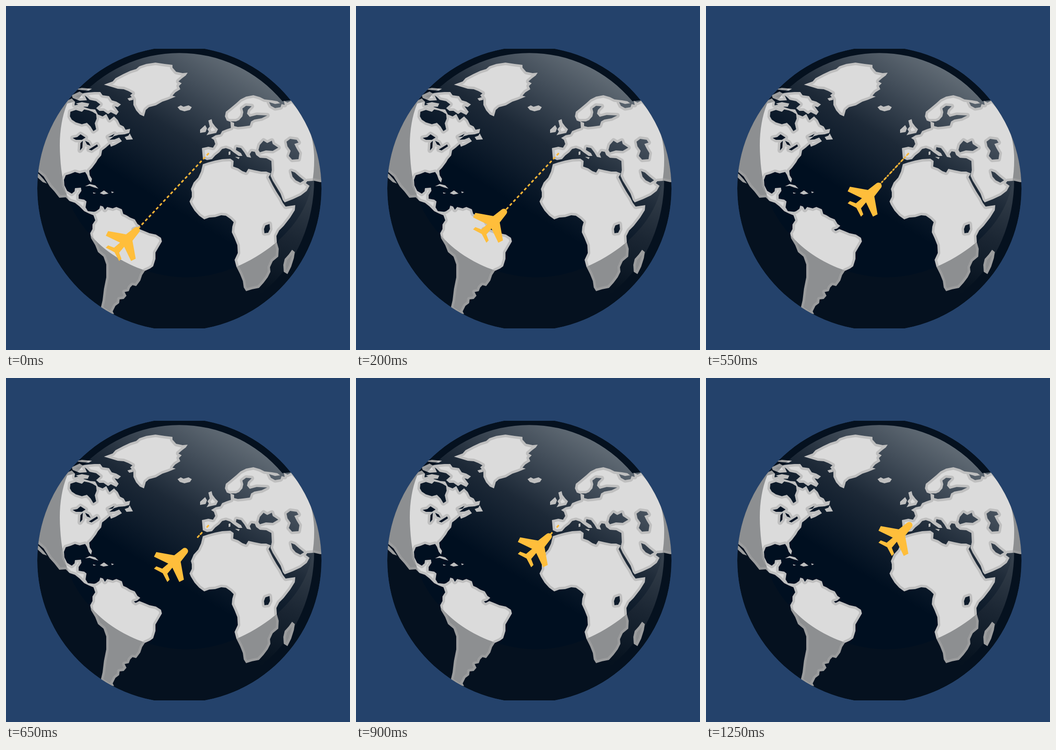
These frames come from a looping animation (748x748 px, 1.3 s). An HTML page:

```html
<!DOCTYPE html>
<html lang="en">
<head>
<meta charset="utf-8">
<title>Flight over the globe</title>
<style>
  html, body { margin: 0; width: 100%; height: 100%; overflow: hidden; background: #24426b; }
  svg { display: block; width: 100vw; height: 100vh; }
</style>
</head>
<body>
<svg viewBox="0 0 748 748">
  <defs>
    <linearGradient id="shine" gradientUnits="userSpaceOnUse" x1="330" y1="420" x2="520" y2="110">
      <stop offset="0" stop-color="#000f20"/>
      <stop offset=".4" stop-color="#1d2937"/>
      <stop offset=".7" stop-color="#434e5a"/>
      <stop offset="1" stop-color="#69737c"/>
    </linearGradient>
    <linearGradient id="glow" gradientUnits="userSpaceOnUse" x1="665" y1="390" x2="565" y2="615">
      <stop offset="0" stop-color="#35404c"/>
      <stop offset=".5" stop-color="#1b2633"/>
      <stop offset="1" stop-color="#06121f"/>
    </linearGradient>
    <clipPath id="band"><rect y="93" width="748" height="608"/></clipPath>
    <clipPath id="ball"><circle cx="377" cy="397" r="309"/></clipPath>
    <path id="lit" d="M133 212C118 250 115 290 118 330C122 400 143 455 184 498C230 552 310 590 395 590C470 590 545 552 592 510C650 458 672 400 670 325C668 275 650 235 620 205L601 207A293 295 0 0 0 153 207Z"/>
    <clipPath id="litClip"><use href="#lit"/></clipPath>

    <g id="land">
      <!-- Greenland, Iceland -->
      <path d="M213 171L232 164 238 157 255 148 270 141 283 137 290 131 305 126 325 123 345 126 362 128 362 134 370 143 384 146 395 145 391 151 383 157 375 164 382 168 376 174 379 181 368 188 362 195 369 197 352 204 340 208 326 216 311 220 304 226 300 240 291 236 283 227 277 215 277 203 270 194 275 190 266 185 256 181 243 180 230 176Z"/>
      <path d="M264 201L274 198 277 204 268 206ZM373 220L380 216 386 219 397 216 404 220 400 226 388 229 378 226Z"/>
      <!-- North America -->
      <path d="M40 215L132 206 143 201 150 208 149 216 160 214 170 220 183 224 194 225 200 236 210 240 218 235 225 248 235 240 243 248 248 258 256 262 260 269 270 267 268 276 258 279 245 280 235 283 225 291 236 290 246 286 252 294 238 302 228 306 226 300 217 308 209 314 207 325 200 333 196 340 187 352 181 358 182 368 187 376 185 384 180 378 176 367 172 361 160 364 150 361 140 365 130 368 126 378 127 390 133 402 143 408 149 403 150 396 163 395 164 402 158 411 158 419 170 421 175 425 173 438 178 446 196 448 190 455 180 451 170 446 160 436 150 428 138 424 130 416 116 417 105 403 95 392 82 371 69 360 40 340Z"/>
      <path d="M60 358L72 366 82 377 89 386 80 383 70 374Z"/>
      <path d="M152 181L165 178 187 180 180 184 165 183ZM165 190L180 188 192 187 205 187 210 194 224 196 230 205 240 208 250 214 243 220 236 218 245 230 240 237 228 231 222 235 212 228 203 228 196 222 205 214 196 207 182 204 176 198Z"/>
      <path d="M143 194L160 186 170 192 176 205 160 206 145 200ZM152 212L165 209 181 212 178 219 165 219ZM258 285L266 282 269 277 276 290 262 291Z"/>
      <path d="M172 392L182 387 194 390 201 397 190 394 182 391ZM204 407L213 401 223 408 212 410ZM189 405L196 407 190 408ZM229 403L235 405 230 407Z"/>
      <!-- South America -->
      <path d="M188 449L196 446 203 441 205 434 211 436 215 443 220 437 232 440 240 437 252 442 255 452 262 455 270 460 280 464 286 474 292 478 285 484 278 486 282 489 290 485 300 489 312 494 326 497 337 504 339 512 332 524 325 536 325 550 320 566 313 571 302 576 296 585 292 597 283 609 275 607 270 612 267 620 258 622 262 630 256 637 247 638 246 646 238 652 232 664 235 670 222 668 206 657 210 640 213 615 218 590 218 562 212 545 200 535 194 520 185 505 183 494 188 485 188 475 194 466Z"/>
      <!-- Europe, western Asia -->
      <path d="M426 309L440 306 450 308 455 300 452 291 446 287 456 281 466 279 470 272 480 268 489 265 488 252 480 249 476 240 478 230 488 222 500 212 510 203 522 197 538 194 552 198 562 203 578 205 590 207 598 213 606 215 604 206 612 210 622 205 660 240 710 300 710 383 683 383 670 380 655 381 652 385 660 391 654 402 641 412 624 420 606 427 602 422 597 408 588 393 580 380 575 369 578 357 577 337 566 331 552 330 544 324 541 317 534 316 530 322 533 330 524 328 518 318 511 309 501 307 500 313 511 320 514 326 506 326 496 319 487 312 478 309 470 311 464 318 455 325 448 333 437 335 428 331Z"/>
      <path d="M440 249L447 246 449 254 455 262 461 268 457 276 443 279 436 281 441 273 438 268 443 262ZM422 269L433 259 437 266 434 274 422 276ZM484 317L488 316 488 323 484 324ZM498 328L508 329 506 333Z"/>
      <!-- Africa -->
      <path d="M428 344L440 340 455 336 470 333 488 332 495 337 494 349 505 353 514 359 522 362 527 354 540 357 555 360 566 360 576 364 571 372 580 390 588 404 597 418 602 428 608 436 629 433 628 444 618 460 604 478 594 488 588 500 589 514 593 528 592 545 580 555 574 568 575 578 569 590 560 602 550 613 535 616 522 620 517 612 515 598 509 583 501 567 497 552 504 537 503 520 497 505 491 492 492 480 495 470 488 463 478 456 468 455 455 459 442 460 431 464 420 456 410 445 402 432 399 425 404 415 404 405 402 398 408 384 418 373 424 360Z"/>
      <path d="M606 550L615 540 622 530 628 535 626 548 620 567 612 583 604 578 603 563Z"/>
    </g>

    <g id="sea">
      <path d="M139 240L140 230 152 226 165 230 170 225 180 227 188 230 196 235 197 245 193 255 196 268 190 272 184 262 176 254 165 257 152 253 143 247Z"/>
      <path d="M145 287L155 285 162 279 173 286 165 291 152 291ZM162 298L167 293 166 308 161 314ZM172 293L180 297 184 304 176 301ZM180 312L198 301 200 305 186 314ZM222 285L236 278 232 284Z"/>
      <path d="M488 251L500 251 507 248 514 240 516 231 514 223 522 217 534 218 526 226 524 234 530 241 545 237 568 238 556 244 540 247 533 251 530 260 515 262 504 263 496 261 496 254Z"/>
      <path d="M572 209L585 213 600 211 597 220 585 222 576 217Z"/>
      <path d="M549 313L552 302 560 293 568 298 578 293 580 300 592 308 580 315 565 314 552 318Z"/>
      <path d="M610 295L618 289 632 291 636 297 627 300 632 310 638 320 636 333 622 334 615 326 619 315 612 305Z"/>
      <path d="M620 359L628 362 638 371 648 379 640 384 630 379 623 371ZM561 485L564 477 573 474 574 485 570 493 562 494Z"/>
    </g>

    <mask id="coast" maskUnits="userSpaceOnUse" x="0" y="0" width="748" height="748">
      <use href="#land" fill="#fff"/>
      <use href="#sea" fill="#000"/>
    </mask>
  </defs>

  <rect width="748" height="748" fill="#24426b"/>
  <g clip-path="url(#band)">
    <g clip-path="url(#ball)">
      <circle cx="377" cy="397" r="309" fill="#05111f"/>
      <path d="M670 370C672 470 630 570 550 628L592 510Z" fill="url(#glow)"/>
      <use href="#lit" fill="url(#shine)"/>
      <g mask="url(#coast)" stroke-width="11" stroke-linejoin="round">
        <use href="#land" fill="#8d8f91" stroke="#9b9c9d"/>
        <g clip-path="url(#litClip)">
          <use href="#land" fill="#dbdbdb" stroke="#bfbfbf"/>
          <use href="#sea" fill="none" stroke="#bfbfbf"/>
        </g>
      </g>
    </g>
  </g>

  <g fill="none" stroke="#f8b637">
    <path id="haze" stroke-width="2.5" opacity=".45"/>
    <path id="route" stroke-width="3.4"/>
  </g>
  <path id="plane" fill="#ffbe3b" d="M-5-5A7 7 0 0 1 5 5L-9 23-2 62-12 67-27 36-38 49-33 62-38 67-48 48-67 38-62 33-49 38-36 27-67 12-62 2-23 9Z"/>
</svg>
<script>
  const LOOP = 1300, STEP = 50;
  const END = [441, 320];
  // time in ms, x of the nose
  const KEYS = [[0, 284], [100, 302.5], [350, 350], [550, 375], [800, 409.5], [1050, 433], [1250, 442]];
  const $ = id => document.getElementById(id);
  const plane = $('plane'), route = $('route'), haze = $('haze');

  function noseX(t) {
    const i = Math.max(1, KEYS.findIndex(k => k[0] >= t));
    const [t0, x0] = KEYS[i - 1], [t1, x1] = KEYS[i];
    return x0 + (x1 - x0) * (t - t0) / (t1 - t0);
  }

  function dashes(t) {
    if (t < 300) return '6.5 5';
    return t < 650 ? '7 4 4 3' : '7 14 7 2 7 200';
  }

  function draw(now) {
    const t = Math.floor((now % LOOP) / STEP) * STEP;
    const x = noseX(t), y = 320 + (442 - x) * 1.06;
    const line = `M${END}L${x} ${y}`;
    plane.setAttribute('transform', `translate(${x} ${y})`);
    route.setAttribute('d', line);
    route.setAttribute('stroke-dasharray', dashes(t));
    route.style.display = t > 1100 ? 'none' : '';
    haze.setAttribute('d', line);
    haze.style.display = t >= 300 && t < 650 ? '' : 'none';
  }

  const start = performance.now();
  function tick() {
    draw(performance.now() - start);
    requestAnimationFrame(tick);
  }
  tick();
</script>
</body>
</html>
```
